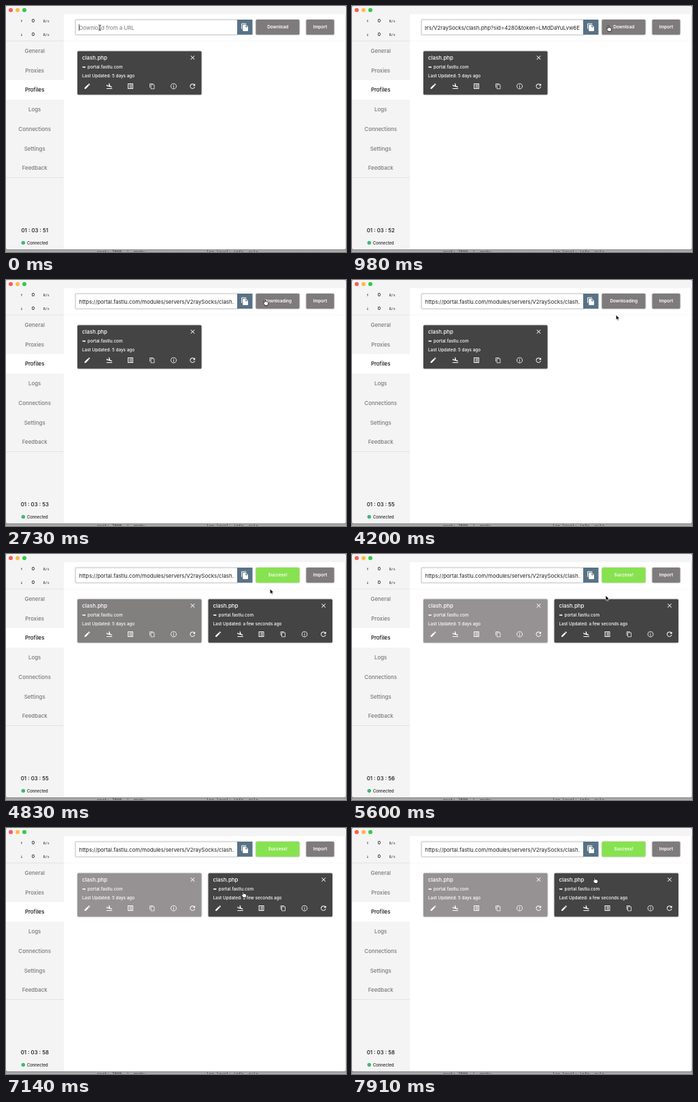
An HTML page for the animation above (8000 ms loop, 500 by 362 pixels).

```html
<!DOCTYPE html>
<html lang="en">
<head>
<meta charset="utf-8">
<title>Profiles</title>
<style>
html, body { margin: 0; width: 100%; height: 100%; overflow: hidden; background: #8c8c8c; }
svg { display: block; width: 500px; height: 362px; font: 7.9px Inter, sans-serif; }
text { white-space: pre; }
.mid { text-anchor: middle; }
.nav { fill: #77777a; font-weight: 500; }
.on { fill: #111; }
.btn { fill: #fff; font-size: 6.4px; font-weight: 600; text-anchor: middle; }
.card { fill: #fff; font-weight: 500; }
.small { font-size: 6.35px; }
.rate { font: 5px "DejaVu Sans Mono", monospace; fill: #222; text-anchor: middle; }
.desk { font: 6px "DejaVu Sans Mono", monospace; fill: #333; }
.raised { filter: drop-shadow(0 .6px .8px rgba(0, 0, 0, .3)); }
</style>
</head>
<body>
<svg id="stage" viewBox="0 0 500 362">
  <defs>
    <clipPath id="field"><rect x="107" y="21" width="228" height="20"/></clipPath>
    <linearGradient id="desk" x2="0" y2="1">
      <stop stop-color="#777"/><stop offset="1" stop-color="#b4b4b4"/>
    </linearGradient>
  </defs>

  <rect y="355" width="500" height="7" fill="url(#desk)"/>
  <text class="desk" x="134" y="364">port: 7890  |  mode:</text>
  <text class="desk" x="295" y="364">log-level: info  rule</text>
  <rect width="500" height="358" rx="3" fill="#fff"/>
  <path d="M499.5 12V356" stroke="#d8d8d8"/>
  <path d="M0 12V3a3 3 0 0 1 3-3H497a3 3 0 0 1 3 3V12H85V358H3a3 3 0 0 1-3-3z" fill="#f4f4f4"/>
  <circle cx="7" cy="6" r="3" fill="#fc5b57"/>
  <circle cx="17" cy="6" r="3" fill="#fdbc40"/>
  <circle cx="27" cy="6" r="3" fill="#34c84a"/>
  <rect y="109" width="85" height="28.8" fill="#fff"/>
  <path d="M0 51.5H85M0 252.5H85" stroke="#e4e4e4"/>
  <path d="M85 51.5H499" stroke="#f7f7f7"/>
  <g id="side"></g>
  <text id="clock" class="mid" x="42.3" y="333.4" font-weight="500" fill="#111"></text>
  <circle cx="25.3" cy="348.5" r="2.8" fill="#3dba78"/>
  <text x="31" y="350.6" style="font-size:5.85px" font-weight="500" fill="#222">Connected</text>

  <rect class="raised" x="102.5" y="20.5" width="238" height="21.5" fill="#fff" stroke="#d0d0d0" stroke-width=".8"/>
  <g clip-path="url(#field)"><text id="url" y="34.6"></text></g>
  <path id="caret" d="M107.4 26.5V36.5" stroke="#222" stroke-width=".7"/>
  <rect x="340" y="20" width="22.5" height="22.3" fill="#587286"/>
  <g id="paste" fill="#fff"></g>
  <rect id="get" class="raised" x="367.5" y="20" width="64" height="22.3" rx="1.5"/>
  <text id="getText" class="btn" x="399.7" y="33.4"></text>
  <rect class="raised" x="441.5" y="20" width="41" height="22.3" rx="1.5" fill="#7f7b7c"/>
  <text class="btn" x="462" y="33.4">Import</text>

  <g id="cards"></g>

  <g id="cursor" stroke-linejoin="round" stroke-linecap="round">
    <g id="beam" fill="none">
      <path d="M-1.6-4Q0-4 0-3V3Q0 4-1.6 4M1.6-4Q0-4 0-3M0 3Q0 4 1.6 4" stroke="#fff" stroke-width="1.8"/>
      <path d="M-1.6-4Q0-4 0-3V3Q0 4-1.6 4M1.6-4Q0-4 0-3M0 3Q0 4 1.6 4" stroke="#111" stroke-width=".8"/>
    </g>
    <path id="arrow" d="M-1.7-4V3.2L0 1.7 1 4.2 2.2 3.7 1.2 1.3H3.5z" fill="#000" stroke="#fff" stroke-width=".6"/>
    <path id="hand" d="M-1.3 4.3C-1.4 3-3.6 1.6-3.7.4-3.6-.5-2.6-.3-2 .5V-3.6C-1.9-4.6-.6-4.6-.5-3.6V-1.1C0-1.7.9-1.5 1-.9 1.5-1.4 2.3-1.1 2.3-.5 3-.9 3.6-.4 3.6.3V1.7C3.6 2.8 2.9 3.2 2.8 4.3z" fill="#fff" stroke="#111" stroke-width=".8"/>
  </g>
</svg>
<script>
const LOOP = 8000, STEP = 70;
const URL_TEXT = 'https://portal.fastlu.com/modules/servers/V2raySocks/clash.php?sid=4280&token=LMdDaYuLvw6E';
const ICONS = {
  edit: 'M3 17.25V21h3.75L17.81 9.94l-3.75-3.75zM20.71 7.04a1 1 0 0 0 0-1.41l-2.34-2.34a1 1 0 0 0-1.41 0l-1.83 1.83 3.75 3.75z',
  land: 'M2.5 19h19v2h-19zm7.18-5.73l9.66 2.58c.8.21 1.62-.26 1.84-1.06.21-.8-.26-1.62-1.06-1.84l-5.31-1.42-2.76-9.02L10.12 2v8.28L5.15 8.95l-.93-2.32-1.45-.39v5.17l1.6.43z',
  list: 'M3 3H21V21H3zM5 5V19H19V5zM11 7h6v2h-6zm0 4h6v2h-6zm0 4h6v2h-6zM7 7h2v2H7zm0 4h2v2H7zm0 4h2v2H7z',
  copy: 'M16 1H4a2 2 0 0 0-2 2v14h2V3h12zM19 5H8a2 2 0 0 0-2 2v14a2 2 0 0 0 2 2h11a2 2 0 0 0 2-2V7a2 2 0 0 0-2-2zM19 21H8V7h11z',
  info: 'M11 7h2v2h-2zm0 4h2v6h-2zM12 2a10 10 0 1 0 0 20 10 10 0 0 0 0-20zM12 20a8 8 0 1 1 0-16 8 8 0 0 1 0 16z',
  refresh: 'M17.65 6.35A8 8 0 1 0 19.73 14h-2.08A6 6 0 1 1 12 6c1.66 0 3.14.69 4.22 1.78L13 11h7V4z',
  close: 'M19 6.41L17.59 5 12 10.59 6.41 5 5 6.41 10.59 12 5 17.59 6.41 19 12 13.41 17.59 19 19 17.59 13.41 12z',
  file: 'M16 1H4a2 2 0 0 0-2 2v14h2V3h12zM15 5l6 6v10a2 2 0 0 1-2 2H8a2 2 0 0 1-2-2V7a2 2 0 0 1 2-2zM14 12h5.5L14 6.5z'
};
// time, x, y
const PATH = [
  [0, 138, 32], [420, 138, 32], [980, 378, 33], [1260, 382, 33], [3080, 382, 33],
  [3500, 389, 53], [3850, 389, 53], [3990, 390, 55.5], [5250, 390, 55.5],
  [6440, 317, 102], [7000, 349, 99], [7140, 350, 98], [7210, 350, 98],
  [7350, 355, 97], [7560, 355, 97], [7910, 358, 77]
];

const $ = id => document.getElementById(id);
const mix = (a, b, k) => a + (b - a) * k;
const ease = k => k * k * (3 - 2 * k);
const icon = (name, x, y, size) =>
  `<path fill-rule="evenodd" transform="translate(${x - size / 2} ${y - size / 2}) scale(${size / 24})" d="${ICONS[name]}"/>`;

function card(id, x, age) {
  const tools = [['edit', 14.5], ['land', 47], ['list', 78], ['copy', 110], ['info', 141.5], ['refresh', 169.3]];
  return `<g id="${id}" class="card" transform="translate(${x})">
    <rect class="raised" y="66.5" width="182.5" height="64" rx="1.5" fill="#444"/>
    <text x="7" y="79">clash.php</text>
    <text x="7" y="92" style="font:6.6px 'DejaVu Sans',sans-serif">➥</text>
    <text class="small" x="15" y="92">portal.fastlu.com</text>
    <text class="small" x="7" y="105">Last Updated: ${age}</text>
    ${icon('close', 169.5, 76, 10.5)}
    ${tools.map(([name, dx]) => icon(name, dx, 118, name === 'copy' ? 9 : name === 'refresh' ? 11.5 : 10.5)).join('')}
  </g>`;
}

$('side').innerHTML =
  ['General', 'Proxies', 'Profiles', 'Logs', 'Connections', 'Settings', 'Feedback'].map((name, i) =>
    `<text class="mid nav${i === 2 ? ' on' : ''}" x="42.2" y="${68.8 + i * 28.75}">${name}</text>`).join('') +
  [['↑', 22], ['↓', 41.5]].map(([sign, y]) =>
    `<text class="rate" x="23" y="${y + 2}" style="font-size:6.5px">${sign}</text>
     <text class="mid on" x="40" y="${y + 2.4}" style="font-size:6.8px" font-weight="500">0</text>
     <text class="rate" x="59.3" y="${y + 2}">B/s</text>`).join('');
$('paste').innerHTML = icon('file', 351.3, 31.2, 12.5);
$('cards').innerHTML = card('old', 105, '5 days ago') + card('fresh', 297.5, 'a few seconds ago');
const oldFill = document.querySelector('#old rect');

function cursorAt(t) {
  const i = PATH.findIndex(p => p[0] > t);
  if (i < 0) return PATH[PATH.length - 1].slice(1);
  const [a, b] = [PATH[i - 1], PATH[i]];
  const k = ease((t - a[0]) / (b[0] - a[0]));
  return [mix(a[1], b[1], k), mix(a[2], b[2], k)];
}

function cursorKind(x, y) {
  if (y > 20 && y < 42) return x < 340 ? 'beam' : x > 362.5 && x < 367.5 ? 'arrow' : 'hand';
  return y > 66 && y < 131 && x > 297 ? 'hand' : 'arrow';
}

function draw(now) {
  const t = Math.floor(now % LOOP / STEP) * STEP;
  const pasted = t >= 140, focused = t < 1680, done = t >= 4830;

  const url = $('url');
  url.textContent = pasted ? URL_TEXT : 'Download from a URL';
  url.setAttribute('fill', pasted ? '#222' : '#777');
  url.setAttribute('x', pasted && focused ? 335 : 107.5);
  url.setAttribute('text-anchor', pasted && focused ? 'end' : 'start');
  $('caret').style.display = pasted ? 'none' : '';

  $('getText').textContent = done ? 'Success!' : t >= 1890 ? 'Downloading' : 'Download';
  $('get').setAttribute('fill', done ? '#87e250' : '#7f7b7c');
  $('clock').textContent = '01 : 03 : ' + (51 + Math.floor((t + 70) / 1000));

  $('fresh').style.display = done ? '' : 'none';
  const fade = done ? Math.min(1, .75 + (t - 4830) / 560) : 0;
  const [r, g, b] = [150, 146, 147].map(c => Math.round(mix(68, c, fade)));
  oldFill.setAttribute('fill', `rgb(${r},${g},${b})`);

  const [x, y] = cursorAt(t), kind = cursorKind(x, y);
  $('cursor').setAttribute('transform', `translate(${x} ${y})`);
  for (const id of ['beam', 'arrow', 'hand']) $(id).style.display = id === kind ? '' : 'none';
}

const start = performance.now();
function loop() {
  draw(performance.now() - start);
  requestAnimationFrame(loop);
}
loop();
</script>
</body>
</html>
```
